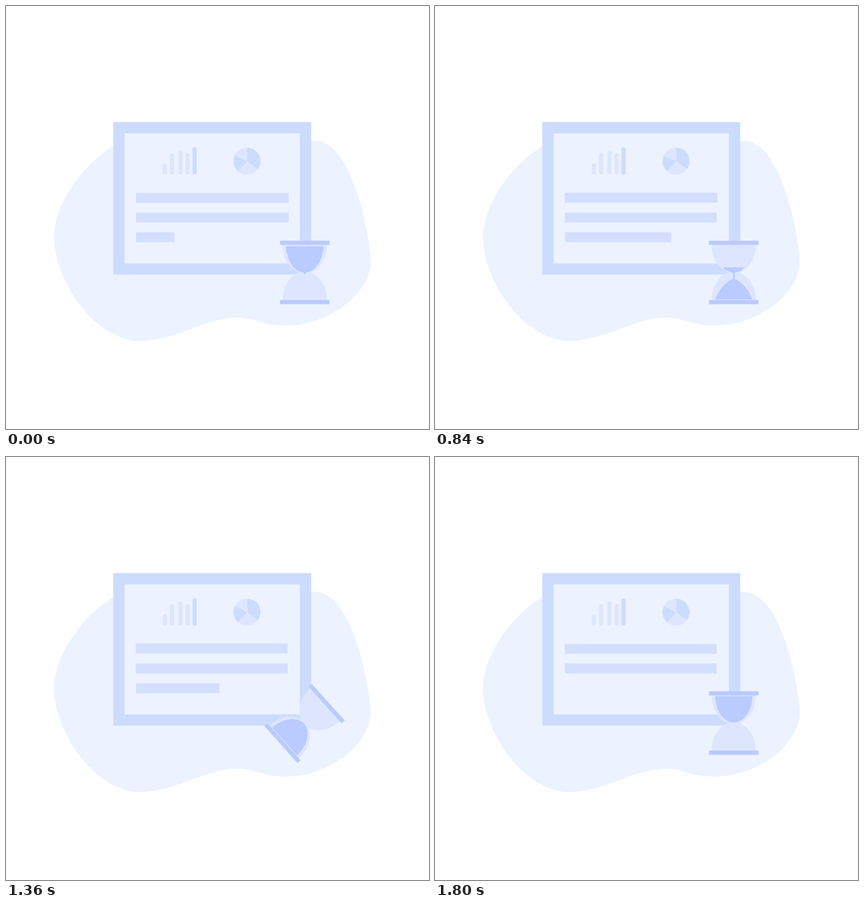
An HTML page with a canvas that plays this animation: 748 px wide and 748 px high, repeating every 1820 ms.

```html
<!DOCTYPE html>
<html lang="en">
<head>
<meta charset="utf-8">
<title>Report loading</title>
<style>
html, body { margin: 0; width: 100%; height: 100%; overflow: hidden; background: #fff; }
canvas { display: block; width: 748px; height: 748px; }
</style>
</head>
<body>
<canvas id="stage" width="748" height="748"></canvas>
<script>
const ctx = document.getElementById('stage').getContext('2d');
const LOOP = 1820, STEP = 20, CYCLE = 600, GROW = 400, SCROLL = 100;
const PALE = '#ecf3ff', FRAME = '#ccdcff', LINE = '#d4deff', GLASS = '#dee6ff', SAND = '#b9cbff';
const CX = 528.3, CY = 470.8;

const clamp = v => Math.max(0, Math.min(1, v));
const mix = (a, b, k) => a + (b - a) * k;

function rect(color, x, y, w, h) {
  ctx.fillStyle = color;
  ctx.fillRect(x, y, w, h);
}

function fillPath(color, d) {
  ctx.fillStyle = color;
  ctx.fill(new Path2D(d));
}

// Piecewise linear value; keys are [time, ...values]
function track(keys, t) {
  let i = 1;
  while (i < keys.length - 1 && t > keys[i][0]) i++;
  const a = keys[i - 1], b = keys[i];
  const k = clamp((t - a[0]) / (b[0] - a[0]));
  return a.slice(1).map((v, n) => mix(v, b[n + 1], k));
}

function drawBlob() {
  fillPath(PALE, 'M190 248C155 266 84 338 85 412C86 487 158 592 237 592.5' +
    'C300 592 355 551 408 551C440 551 450 565 495 565' +
    'C570 565 645 510 645 450C645 425 618 238 545 238L400 238Z');
}

function drawBoard() {
  rect(FRAME, 189.7, 205.2, 350, 269.8);
  rect(PALE, 209.7, 225.2, 310, 230);

  const bars = [[277, 278], [289.8, 260], [304.7, 255], [317.2, 260], [329.6, 250]];
  bars.forEach(([x, y], i) => {
    ctx.fillStyle = i === 4 ? FRAME : GLASS;
    ctx.beginPath();
    ctx.roundRect(x, y, 7.7, 298 - y, 3.8);
    ctx.fill();
  });

  const cuts = [-90, 37, 131, 206, 270];
  for (let i = 0; i < 4; i++) {
    ctx.fillStyle = i % 2 ? GLASS : FRAME;
    ctx.beginPath();
    ctx.moveTo(426.6, 274.6);
    ctx.arc(426.2, 274.3, 23.9, cuts[i] * Math.PI / 180, cuts[i + 1] * Math.PI / 180);
    ctx.fill();
  }
}

function drawLines(t) {
  const cycle = Math.min(2, Math.floor(t / CYCLE));
  const local = t - cycle * CYCLE;
  const grow = clamp(local / GROW);
  const scroll = clamp((local - GROW) / SCROLL);
  const left = mix(230, 229.5, grow);
  const firstLeft = cycle ? 229.5 : left;
  const top = [330.5, 330.2, 329.6][cycle];
  const nextTop = [330.2, 329.6, 330.5][cycle];
  const widths = [[270, 270], [270, 268.5], [268.5, 268.5]][cycle];

  ctx.globalAlpha = 1 - scroll;
  rect(LINE, firstLeft, top - 35 * scroll, widths[0], 17.5);
  ctx.globalAlpha = 1;
  rect(LINE, firstLeft, mix(365.3, nextTop, scroll), widths[1], 17.5);
  if (scroll < 1) {
    rect(LINE, left, 400.2 - 35 * scroll, mix(67.5, 268.5, grow), 17.5);
  } else {
    rect(LINE, 229.5, 365.2, 268.5, 17.5);
  }
}

function drawGlass() {
  const half = 'M-39.3 -49H39.3C39 -21 23 -2 5 1H-5C-23 -2 -39 -21 -39.3 -49Z';
  for (const side of [1, -1]) {
    ctx.save();
    ctx.translate(0, 0.4);
    ctx.scale(1, side);
    fillPath(GLASS, half);
    rect(SAND, -43.8, -56.2, 87.6, 7.5);
    ctx.restore();
  }
}

function drawSand(t) {
  const [level] = track([[0, 425], [500, 441], [840, 462], [1120, 475]], t);
  if (t < 1120) {
    ctx.save();
    ctx.beginPath();
    ctx.rect(-45, level - CY, 90, 100);
    ctx.clip();
    ctx.translate(0, -CY);
    fillPath(SAND, 'M-33.5 425H33.5C32 446 21 468 5 470.5L2 471.5L1.4 474H-1.4L-2 471.5' +
      'L-5 470.5C-21 468 -32 446 -33.5 425Z');
    ctx.restore();
  }

  // Pile: apex, two control points of the right flank, half base
  const [apex, ax, ay, bx, by, base] = track([
    [100, 518.7, 0, 518.7, 0, 518.7, 0],
    [500, 500, 6, 506.2, 12, 512.5, 18],
    [840, 482, 14, 487, 26, 501, 33],
    [1120, 472, 18, 473, 32, 492, 33]
  ], t);
  ctx.save();
  ctx.translate(0, -CY);
  if (t > 0 && t < 1120) {
    const end = Math.min(apex + 2, 473 + 46 * clamp(t / 100));
    rect(SAND, -1.4, 470, 2.8, Math.max(0, end - 470));
  }
  fillPath(SAND, `M0 ${apex}C${ax} ${ay} ${bx} ${by} ${base} 518.7H${-base}` +
    `C${-bx} ${by} ${-ax} ${ay} 0 ${apex}Z`);
  ctx.restore();
}

function draw(t) {
  rect('#fff', 0, 0, 748, 748);
  drawBlob();
  drawBoard();
  drawLines(t);
  ctx.save();
  ctx.translate(CX, CY);
  ctx.rotate(Math.PI * clamp((t - 1200) / 600));
  drawGlass();
  drawSand(t);
  ctx.restore();
}

let start;
function tick(now) {
  if (start === undefined) start = now;
  const t = (now - start) % LOOP;
  draw(Math.floor(t / STEP + 1e-6) * STEP);
  requestAnimationFrame(tick);
}
draw(0);
requestAnimationFrame(tick);
</script>
</body>
</html>
```
